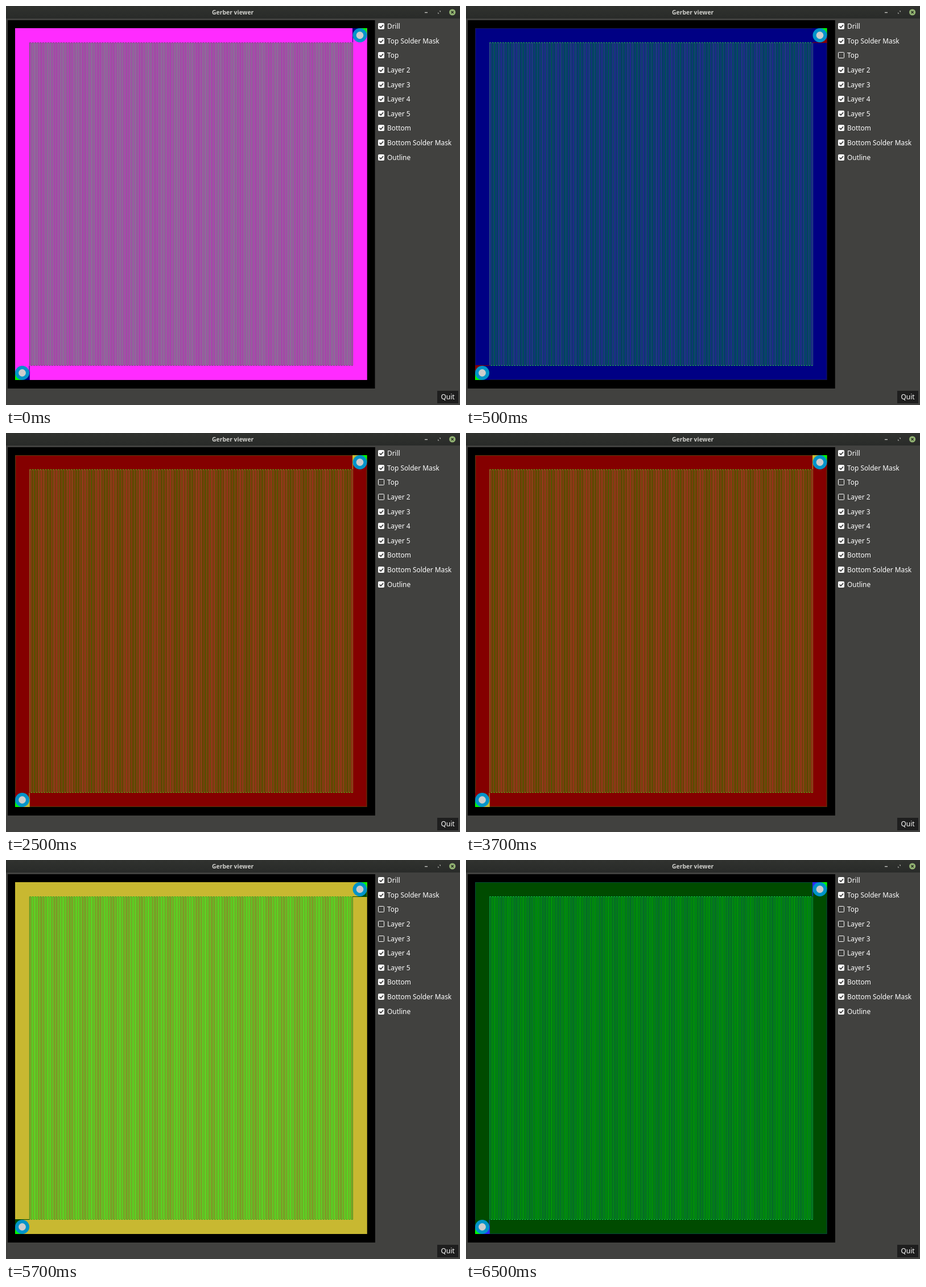
These frames come from a looping animation (798 by 702 pixels, 8 s). An HTML page with a canvas:

```html
<!DOCTYPE html>
<html lang="en">
<head>
<meta charset="utf-8">
<title>Gerber viewer</title>
<style>
html, body { margin: 0; width: 100%; height: 100%; overflow: hidden; background: #41413f; }
svg, canvas { position: absolute; left: 0; top: 0; width: 798px; height: 702px; }
text { font-family: "Noto Sans", sans-serif; font-size: 11.9px; fill: #fff; }
</style>
</head>
<body>
<canvas id="board" width="798" height="702"></canvas>
<svg id="ui" viewBox="0 0 798 702">
  <defs>
    <linearGradient id="bar" x2="0" y2="1">
      <stop stop-color="#30322f"/><stop offset="1" stop-color="#292b29"/>
    </linearGradient>
  </defs>
  <rect width="798" height="22" fill="url(#bar)"/>
  <text x="398.7" y="15.3" text-anchor="middle" style="font-size:10.4px;font-weight:700;fill:#d0d0cc">Gerber viewer</text>
  <path d="M736 11.5h5" stroke="#c4c4c0" stroke-width="1.4"/>
  <path d="M761.5 8.5h2.5v2.5zM759 11v2.5h2.5z" fill="#b4b4b0"/>
  <circle cx="784.6" cy="11" r="5.6" fill="#92b372"/>
  <path d="M782.6 9l4 4m0-4l-4 4" stroke="#262b22" stroke-width="1.3"/>
  <rect x="758" y="677" width="37" height="22" fill="#1e1e1e"/>
  <text x="764.5" y="692">Quit</text>
</svg>
<script>
const LABELS = ["Drill", "Top Solder Mask", "Top", "Layer 2", "Layer 3", "Layer 4",
  "Layer 5", "Bottom", "Bottom Solder Mask", "Outline"];
const BOARD = { x: 16, y: 39, w: 618.5, h: 619 };
const COIL = { left: 41.5, right: 609.3, top: 64.5, bottom: 632.5, turns: 125 };
// plane, corner, outline, coil line pair, line width, coil ends
const VIEWS = [
  ["#ff2bff", "#000084", "#ff2bff", [40, 165, 62], [92, 88, 96], 1.2, "#7d3a80"],
  ["#000084", "#840000", "#17174f", [0, 190, 28], [92, 116, 150], 0.85, "#2ccf3c"],
  ["#840000", "#c8b831", "#55390c", [28, 190, 0], [178, 134, 72], 0.9, "#56c81c"],
  ["#c8b831", "#004b00", "#c8b831", [0, 232, 24], [72, 120, 34], 1.25, "#46a424"],
  ["#004b00", "#2b2bff", "#064a38", [0, 224, 20], [14, 150, 92], 1, "#14cf58"]
];
const NS = "http://www.w3.org/2000/svg";
const ui = document.getElementById("ui");
const g = document.getElementById("board").getContext("2d");

function add(tag, attrs, text) {
  const el = document.createElementNS(NS, tag);
  for (const k in attrs) el.setAttribute(k, attrs[k]);
  if (text) el.textContent = text;
  ui.append(el);
  return el;
}

const checks = LABELS.map((label, i) => {
  const y = 35.7 + i * 25.6, top = Math.round(y - 5.5);
  add("text", { x: 670, y: y + 4.4 }, label);
  const box = add("rect", { x: 654.5, y: top + 0.5, width: 10, height: 10, rx: 1, stroke: "#fff" });
  const tick = add("path", {
    d: `M656.6 ${top + 5.6}l2.3 2.4 4.2-4.7`, fill: "none", stroke: "#333", "stroke-width": 1.6
  });
  return on => {
    box.setAttribute("fill", on ? "#fff" : "none");
    tick.style.display = on ? "" : "none";
  };
});

function poly(color, ...pts) {
  g.fillStyle = color;
  g.beginPath();
  for (const [x, y] of pts) g.lineTo(x, y);
  g.fill();
}

function disc(r, color) {
  g.fillStyle = color;
  g.beginPath();
  g.arc(622, 51.5, r, 0, 7);
  g.fill();
}

function corner(plane, gap, odd) {
  poly(plane, [609, 39], [634.5, 39], [634.5, 64], [609, 64]);
  if (odd) {
    poly(gap, [634.5, 65], [620, 65], [634.5, 50]);
    poly(gap, [609, 64], [634.5, 64], [634.5, 65], [609, 65]);
  } else {
    poly(gap, [609, 39], [624, 39], [609, 54]);
    poly(gap, [609, 39], [610, 39], [610, 64], [609, 64]);
  }
  poly("#00ff00", [622, 39], [634.5, 39], [634.5, 51.5]);
  disc(12.5, "#0094c9");
  disc(6.4, "#cccccc");
}

function coil(a, b, width, ends) {
  const { left, right, top, bottom, turns } = COIL;
  const step = (right - left) / turns / 2;
  for (let i = 0; i <= turns * 2; i++) {
    const x = left + i * step;
    const k = i === 0 || i === turns * 2 ? 0.8 : (i % 2) * 0.45 + 0.25 * (1 - Math.cos(x * Math.PI / 12.5));
    g.fillStyle = `rgb(${a.map((v, n) => v + (b[n] - v) * k)})`;
    g.fillRect(x - width / 2, top, width, bottom - top);
    if (i < turns * 2) {
      g.fillStyle = ends;
      g.fillRect(x, (i % 2 ? bottom : top) - 0.5, step, 1);
    }
  }
}

function draw(view) {
  const [plane, gap, edge, a, b, width, ends] = VIEWS[view];
  g.fillStyle = "#000";
  g.fillRect(3, 25, 645.5, 648);
  g.fillStyle = plane;
  g.fillRect(BOARD.x, BOARD.y, BOARD.w, BOARD.h);
  g.strokeStyle = edge;
  g.lineWidth = 1;
  g.strokeRect(BOARD.x + 0.5, BOARD.y + 0.5, BOARD.w - 1, BOARD.h - 1);
  coil(a, b, width, ends);
  for (const turn of [0, Math.PI]) {
    g.save();
    g.translate(325.25, 348.5);
    g.rotate(turn);
    g.translate(-325.25, -348.5);
    corner(plane, gap, view % 2);
    g.restore();
  }
  checks.forEach((set, i) => set(i < 2 || i >= 2 + view));
}

const start = performance.now();
let shown = -1;
function tick() {
  const t = (performance.now() - start) % 8000;
  const view = Math.floor((t + 1500) / 2000);
  if (view !== shown) draw(shown = view);
  requestAnimationFrame(tick);
}
tick();
</script>
</body>
</html>
```
